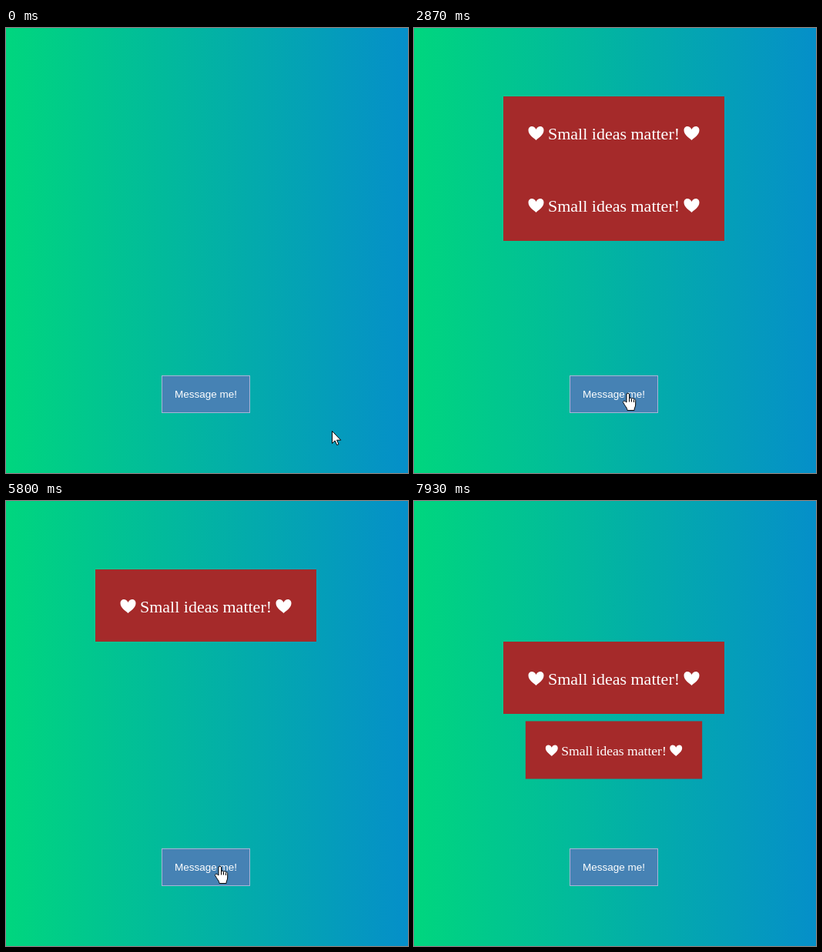
An HTML page for the animation above (8000 ms loop, 522 by 579 pixels).

```html
<!DOCTYPE html>
<html lang="en">
<head>
<meta charset="utf-8">
<title>Toast messages</title>
<style>
  html, body { margin: 0; width: 100%; height: 100%; overflow: hidden; }
  svg { display: block; width: 522px; height: 579px; }
  text { fill: #fff; text-anchor: middle; }
  .toast text { font: 22px "Liberation Serif", "Times New Roman", serif; }
  .label { font: 13.5px "Liberation Sans", Arial, sans-serif; }
  .pointer { fill: #fff; stroke: #000; stroke-linejoin: round; }
</style>
</head>
<body>
<svg viewBox="0 0 522 579">
  <defs>
    <linearGradient id="sky">
      <stop stop-color="#00d67e"/>
      <stop offset="1" stop-color="#058fc9"/>
    </linearGradient>
    <path id="heart" fill="#fff" d="M0 10C-3 7-10 3-10-3C-10-9-2.5-10 0-4C2.5-10 10-9 10-3C10 3 3 7 0 10Z"/>
    <g id="toast">
      <rect x="-143.5" y="-47" width="287" height="94" fill="#a52a2a"/>
      <use href="#heart" x="-101"/>
      <text y="9">Small ideas matter!</text>
      <use href="#heart" x="101"/>
    </g>
  </defs>
  <rect width="522" height="579" fill="url(#sky)"/>
  <g id="stack"></g>
  <rect x="202.5" y="452.5" width="114" height="48" fill="#4682b4" stroke="#a9b4d6"/>
  <text class="label" x="259.5" y="481">Message me!</text>
  <g id="cursor" class="pointer">
    <path id="arrow" d="M.5.5V16.5L4.2 13L6.7 18.6L9 17.6L6.6 12.2H11.8Z"/>
    <path id="hand" d="M-2 12V2A1.75 1.75 0 0 1 1.5 2V7A1.6 1.6 0 0 1 4.5 7.5A1.6 1.6 0 0 1 7.5 8.2A1.5 1.5 0 0 1 9.7 9.4V15C9.7 18 8 19 8 22.5H-1C-1 20-3 18-4.5 15.5L-6.3 12.5C-7.3 10.5-4.5 9.5-3.5 11ZM1.5 7V11.5M4.5 8V11.5M7.5 9V12"/>
  </g>
</svg>
<script>
const LOOP = 8000, STEP = 1000 / 15, ANIM = 800, NEVER = 1e5;
const $ = id => document.getElementById(id);

// Times at which each toast grows, shrinks and leaves the stack
const toasts = [
  [1056, 3250, 4100],
  [2056, 4250, 5050],
  [4982, 7236, NEVER],
  [6590, NEVER, NEVER],
  [7536, NEVER, NEVER]
].map(([grow, shrink, gone]) => {
  const el = $('toast').cloneNode(true);
  el.removeAttribute('id');
  el.setAttribute('class', 'toast');
  $('stack').append(el);
  return { grow, shrink, gone, el };
});

// Pointer path: time, x, y
const path = [
  [0, 423, 524], [20, 423, 524], [400, 278, 475],
  [5800, 278, 475], [5866, 295, 481], [6000, 320, 486],
  [6540, 320, 486], [6870, 482, 480],
  [7410, 482, 480], [7800, 524, 487], [LOOP, 524, 487]
];

const clamp = v => Math.min(1, Math.max(0, v));
const bezier = (a, b, u) => 3 * a * u * (1 - u) ** 2 + 3 * b * u * u * (1 - u) + u ** 3;

// CSS "ease" timing, solved by bisection
function ease(p) {
  if (p <= 0 || p >= 1) return clamp(p);
  let lo = 0, hi = 1;
  for (let i = 0; i < 20; i++) {
    const mid = (lo + hi) / 2;
    if (bezier(.25, .25, mid) < p) lo = mid; else hi = mid;
  }
  return bezier(.1, 1, lo);
}

function drawToasts(t) {
  let slot = 0;
  for (const { grow, shrink, gone, el } of toasts) {
    const present = t >= grow && t < gone;
    el.style.display = present ? '' : 'none';
    if (!present) continue;
    const fade = 1 - ease((t - shrink) / ANIM);
    const scale = ease((t - grow) / ANIM) * fade;
    el.setAttribute('transform', `translate(259.5 ${136 + 94 * slot++}) scale(${scale})`);
    el.setAttribute('opacity', fade);
  }
}

function drawCursor(t) {
  const i = path.findIndex(k => k[0] > t);
  const [t0, x0, y0] = path[i - 1], [t1, x1, y1] = path[i];
  const p = (t - t0) / (t1 - t0);
  const x = Math.round(x0 + (x1 - x0) * p), y = Math.round(y0 + (y1 - y0) * p);
  const over = x >= 202 && x < 317 && y >= 452 && y < 501;
  $('cursor').setAttribute('transform', `translate(${x} ${y})`);
  $('hand').style.display = over ? '' : 'none';
  $('arrow').style.display = over ? 'none' : '';
}

const start = performance.now();
function tick(now) {
  // Advance at 15 steps per second
  const t = Math.floor(Math.max(0, now - start) % LOOP / STEP + .1) * STEP % LOOP;
  drawToasts(t);
  drawCursor(t);
  requestAnimationFrame(tick);
}
tick(start);
</script>
</body>
</html>
```
